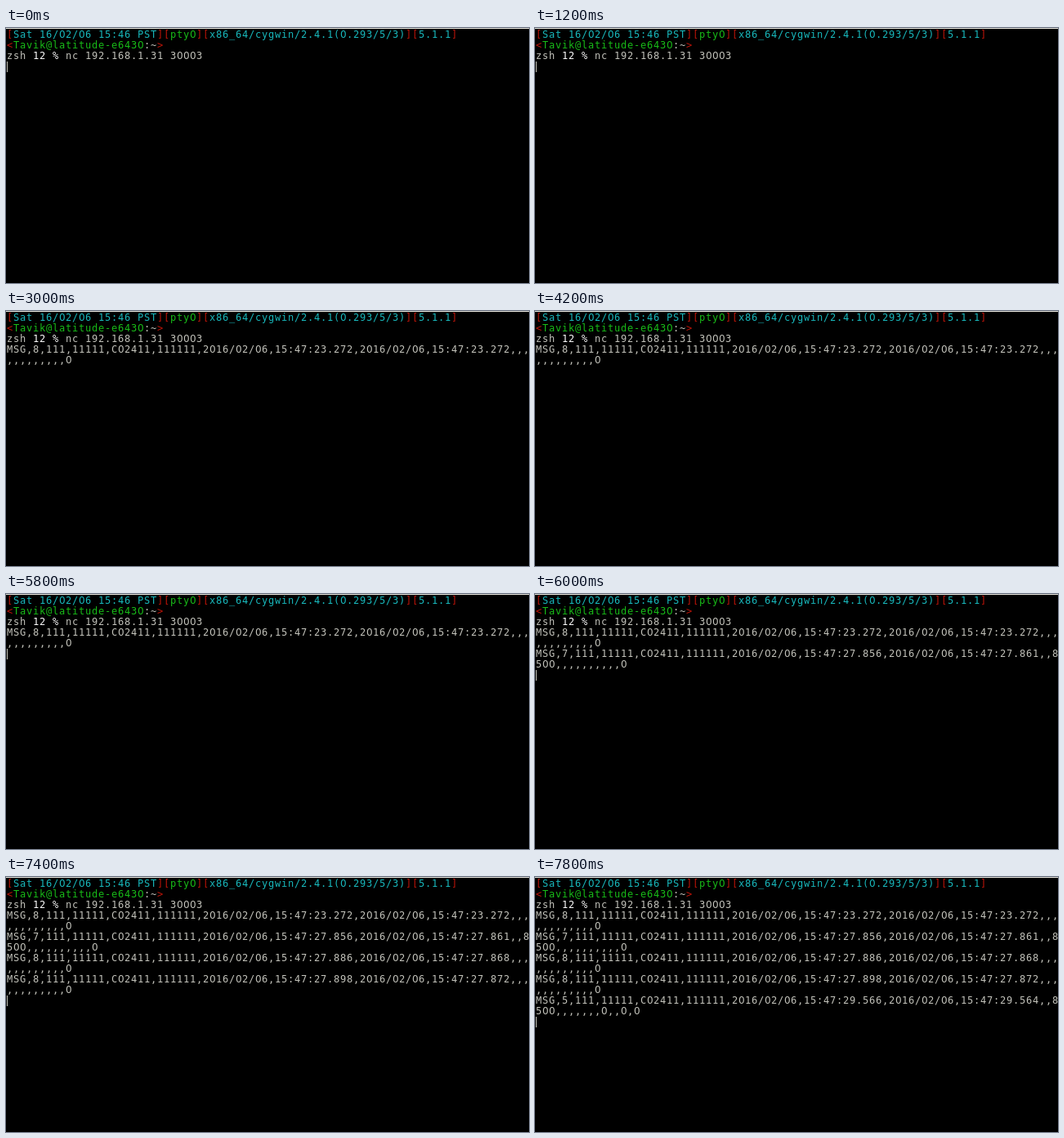
Recreate the animation shown at these times as an HTML page with a canvas. Size 640 by 312 pixels, loop 8 s.

```html
<!DOCTYPE html>
<html lang="en">
<meta charset="utf-8">
<title>Terminal session</title>
<style>
  html, body { margin: 0; height: 100%; overflow: hidden; background: #000; }
  canvas { display: block; }
</style>
<canvas id="screen" width="640" height="312"></canvas>
<script>
const ctx = document.getElementById("screen").getContext("2d");
const LOOP = 8000, COLS = 80, CELL = 8, ROW = 13, TOP = 2, LEFT = 1;
const RED = "#bf1408", CYAN = "#18b8bc", GREEN = "#18bc18", GRAY = "#c2c2ba", WHITE = "#fff";

const header = [
  [["[", RED], ["Sat 16/02/06 15:46 PST", CYAN], ["][", RED], ["pty0", GREEN], ["][", RED],
   ["x86_64/cygwin/2.4.1(0.293/5/3)", CYAN], ["][", RED], ["5.1.1", CYAN], ["]", RED]],
  [["<", RED], ["Tavik@latitude-e6430", GREEN], [":~", GRAY], [">", RED]],
  [["zsh ", GRAY], ["12 % ", WHITE], ["nc 192.168.1.31 30003", GRAY]]
];

const message = (at, type, sent, logged, tail) => ({
  at,
  text: `MSG,${type},111,11111,C02411,111111,2016/02/06,15:47:${sent},2016/02/06,15:47:${logged},${tail}`
});
const empty = ",".repeat(11) + "0";
const messages = [
  message(1600, 8, "23.272", "23.272", empty),
  message(6000, 7, "27.856", "27.861", ",8500" + ",".repeat(10) + "0"),
  message(6200, 8, "27.886", "27.868", empty),
  message(6200, 8, "27.898", "27.872", empty),
  message(7800, 5, "29.566", "29.564", ",8500,,,,,,,0,,0,0")
];

// The cursor changes between on and off at these times.
const blinks = [600, 1200, 2000, 2600, 3000, 3600, 4200, 4800, 5200, 5800, 6800, 7400];

// One character per cell; the zero has no inner mark.
function write(text, row, col, color) {
  ctx.fillStyle = color;
  for (const ch of text) {
    ctx.font = ch === "0" ? '12px "DejaVu Sans", sans-serif' : '12px "DejaVu Sans Mono", monospace';
    ctx.fillText(ch, LEFT + col++ * CELL, TOP + row * ROW + 10);
  }
  return col;
}

function draw(t) {
  ctx.fillStyle = "#000";
  ctx.fillRect(0, 0, 640, 312);
  ctx.fillStyle = "#e8e6de";
  ctx.fillRect(0, 0, 640, 1);

  header.forEach((spans, row) => {
    let col = 0;
    for (const [text, color] of spans) col = write(text, row, col, color);
  });

  let row = header.length;
  for (const { at, text } of messages) {
    if (t < at) break;
    for (let i = 0; i < text.length; i += COLS) write(text.slice(i, i + COLS), row++, 0, GRAY);
  }

  if (blinks.filter(b => b <= t).length % 2 === 0) {
    ctx.fillStyle = GRAY;
    ctx.fillRect(LEFT, TOP + row * ROW, 1, ROW);
  }
}

const start = performance.now();
function tick() {
  draw((performance.now() - start) % LOOP);
  requestAnimationFrame(tick);
}
tick();
</script>
</html>
```
